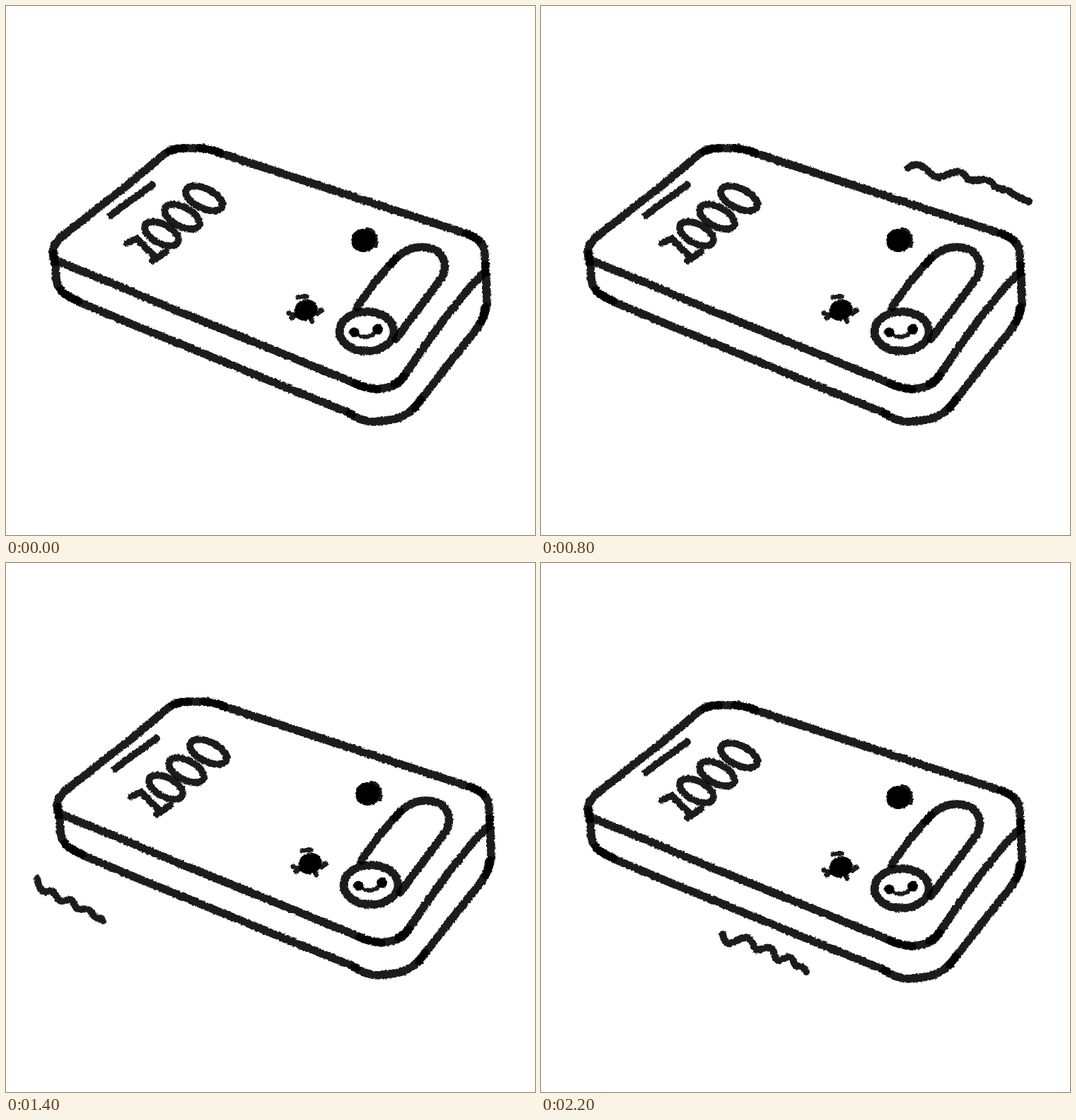
These frames come from a looping animation (748 px wide and 748 px high, 2.4 s). An HTML page:

```html
<!DOCTYPE html>
<html lang="en">
<head>
<meta charset="utf-8">
<title>Ringing phone</title>
<style>
  html, body { margin: 0; width: 100%; height: 100%; overflow: hidden; background: #fff; }
  svg { display: block; width: 100%; height: 100%; }
  .ink { fill: none; stroke: rgba(0, 0, 0, .89); stroke-width: 11.5; stroke-linecap: round; stroke-linejoin: round; }
  .thin { stroke-width: 10; }
  .solid { fill: #000; stroke: none; }

  #phone, .buzz { animation: 2400ms step-end infinite; }
  .buzz { visibility: hidden; }
  #phone { animation-name: shake; }
  #left { animation-name: left; }
  #mid { animation-name: mid; }
  #right { animation-name: right; }
  #top { animation-name: top; }
  #low { animation-name: low; }
  #low2 { animation-name: low2; }

  @keyframes shake {
    0%, 33.33%, 66.66%, 91.66%, 100% { transform: translate(0, 0); }
    16.66%, 50%, 83.33% { transform: translate(6px, -5px); }
  }
  @keyframes left {
    0%, 25%, 66.66%, 100% { visibility: hidden; }
    16.66%, 58.33% { visibility: visible; }
  }
  @keyframes mid {
    0%, 33.33%, 100% { visibility: hidden; }
    25% { visibility: visible; }
  }
  @keyframes right {
    0%, 41.66%, 100% { visibility: hidden; }
    33.33% { visibility: visible; }
  }
  @keyframes top {
    0%, 50%, 100% { visibility: hidden; }
    41.66% { visibility: visible; }
  }
  @keyframes low {
    0%, 58.33%, 91.66%, 100% { visibility: hidden; }
    50%, 83.33% { visibility: visible; }
  }
  @keyframes low2 {
    0%, 100% { visibility: hidden; }
    91.66% { visibility: visible; }
  }
</style>
</head>
<body>
<svg viewBox="0 0 748 748">
  <defs>
    <filter id="chalk" filterUnits="userSpaceOnUse" x="0" y="0" width="748" height="748" color-interpolation-filters="sRGB">
      <feTurbulence type="fractalNoise" baseFrequency=".3" numOctaves="2" seed="4"/>
      <!-- opaque noise keeps the displacement centred -->
      <feColorMatrix values="1 0 0 0 0  0 1 0 0 0  0 0 1 0 0  0 0 0 0 1" result="noise"/>
      <feDisplacementMap in="SourceGraphic" in2="noise" scale="4" xChannelSelector="R" yChannelSelector="G"/>
      <feGaussianBlur stdDeviation=".7"/>
    </filter>
    <path id="wave" d="M261 520Q264 534 270 533C280 531 286 526 292 528C298 532 299 545 305 546C311 546 315 541 321 544C327 550 326 561 331 561C339 560 343 553 349 556C356 561 355 572 360 573C368 571 372 575 371 584"/>
    <path id="ripple" d="M519 229Q530 221 540 227C550 234 554 243 563 242C574 240 584 232 594 235C602 239 602 248 610 247C620 245 632 244 638 250C643 260 650 258 660 261C670 267 678 274 690 276"/>
  </defs>

  <g id="phone">
    <g class="ink" filter="url(#chalk)">
      <!-- top face -->
      <path d="M69 362C63 345 67 336 79 326L172 253L222 211Q235 201 252 201"/>
      <path d="M230 205Q240 201 250 201L278 201Q292 203 303 208"/>
      <path d="M274 201Q290 202 303 208L440 253L645 320Q660 324 668 331"/>
      <path d="M650 322Q676 330 677 350L678 377"/>
      <path d="M678 375L654 400L621 441L589 485L567 517Q560 529 549 534"/>
      <path d="M564 523Q555 535 543 539L525 542Q509 541 494 534"/>
      <path d="M525 542Q512 541 497 535L380 487L232 427L150 392L71 360"/>
      <!-- side -->
      <path d="M68 350L71 384Q72 400 85 408L102 417"/>
      <path d="M77 402Q84 409 102 418L190 455L320 508L400 541L490 577"/>
      <path d="M486 576Q501 587 520 588L546 585Q573 579 586 556"/>
      <path d="M578 568L592 550L622 511L663 460Q676 443 678 425"/>
      <path d="M672 446Q681 430 680 410L678 366"/>
      <!-- answer slider -->
      <path d="M496 426L522 390L551 357"/>
      <path d="M544 365Q562 342 585 341Q608 340 617 355Q624 367 617 383L590 419L551 471"/>
      <ellipse cx="510" cy="460" rx="38.500" ry="28"/>
      <g class="thin">
        <path d="M148 296L168 281L207 253"/>
        <!-- 1000 -->
        <path d="M171 335L185 329L211 355M207 360L226 348"/>
        <ellipse rx="26" ry="13.500" transform="translate(220 322) rotate(28)"/>
        <ellipse rx="27" ry="13.500" transform="translate(249 298) rotate(28)"/>
        <ellipse rx="28" ry="14" transform="translate(280 272) rotate(26)"/>
      </g>
      <!-- torch and bug buttons -->
      <ellipse class="solid" cx="505.500" cy="331.500" rx="17.500" ry="16.500"/>
      <path stroke-width="8" d="M511 317Q523 319 522 338"/>
      <ellipse class="solid" rx="17" ry="14.500" transform="translate(424 430) rotate(-25)"/>
      <path stroke-width="7" d="M413 412L425 411M400 434L408 438L404 441M440 435L446 430M430 441L433 446"/>
      <!-- handset -->
      <path stroke-width="5.500" d="M492 462Q512 475 526 458"/>
      <circle class="solid" cx="492.500" cy="461.500" r="7"/>
      <circle class="solid" cx="525.500" cy="457" r="7.500"/>
    </g>
  </g>

  <g class="ink thin" filter="url(#chalk)">
    <path class="buzz" id="left" d="M44 446Q47 464 56 465C64 462 68 464 72 473C76 482 84 476 91 476C98 481 98 490 104 490C114 488 120 490 123 497C126 504 133 500 137 506"/>
    <use class="buzz" id="mid" href="#wave" x="-97" y="-41"/>
    <use class="buzz" id="right" href="#ripple"/>
    <use class="buzz" id="top" href="#ripple" x="-69" y="-24"/>
    <use class="buzz" id="low" href="#wave"/>
    <path class="buzz" id="low2" d="M257 525Q260 540 267 538C277 535 285 527 293 530C300 534 300 547 307 547C316 545 321 541 327 546C332 552 330 563 336 562C343 561 348 554 354 559C360 566 358 572 364 570Q372 570 375 578"/>
  </g>
</svg>
</body>
</html>
```
